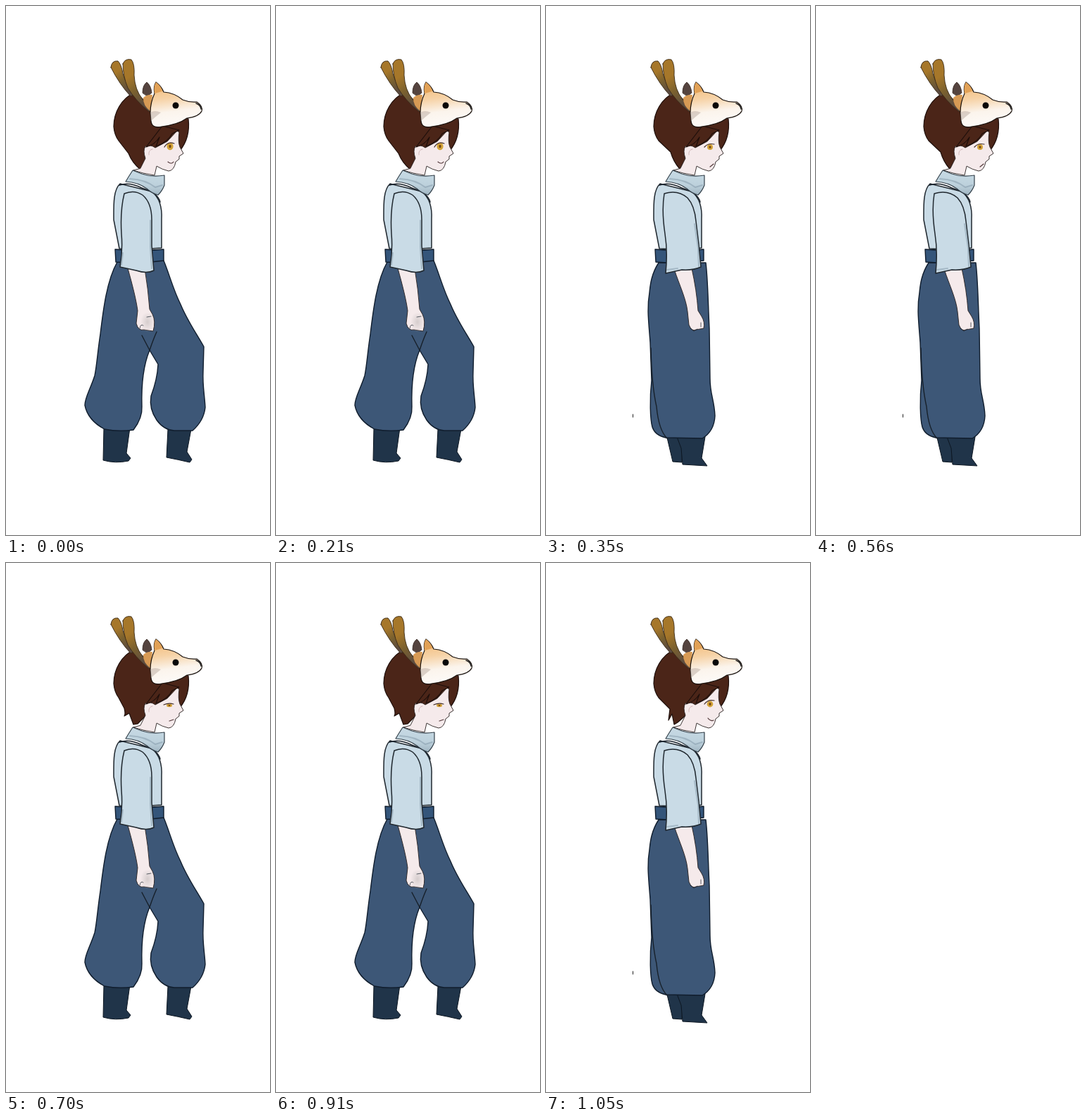
Animation, 375 px wide and 750 px high, one loop 1.4 s. Source, as an HTML page:

```html
<!DOCTYPE html>
<html lang="en">
<head>
<meta charset="utf-8">
<title>Walk cycle</title>
<style>
  html, body { margin: 0; width: 100%; height: 100%; overflow: hidden; background: #fff; }
  svg { display: block; width: 100%; height: 100%; }
  path { stroke-linejoin: round; stroke-linecap: round; }
  .line { fill: none; stroke: #17202a; stroke-width: 1.4; }
  .soft { fill: none; stroke: #8298a8; stroke-width: 2; opacity: .5; }
  .cloth { fill: #c9dbe6; stroke: #20282f; stroke-width: 1.5; }
  .pants { fill: #3d5777; stroke: #101d2d; stroke-width: 1.4; }
  .boot { fill: #203449; stroke: #0c1621; stroke-width: 1; }
  .skin { fill: #f5eaeb; stroke: #28201f; stroke-width: .9; }
  .hair { fill: #4b2518; stroke: #1d0e0a; stroke-width: 1.2; }
</style>
</head>
<body>
<svg viewBox="0 0 375 750">
  <defs>
    <linearGradient id="antler" x1="0" y1="0" x2=".45" y2="1">
      <stop offset=".35" stop-color="#a6772a"/>
      <stop offset=".65" stop-color="#79602f"/>
      <stop offset="1" stop-color="#5b4a40"/>
    </linearGradient>
    <linearGradient id="fur" x1=".35" y1="0" x2=".5" y2="1">
      <stop offset="0" stop-color="#f3bb78"/>
      <stop offset=".35" stop-color="#f6d2a6"/>
      <stop offset=".65" stop-color="#fbf4ec"/>
      <stop offset="1" stop-color="#fdfbf9"/>
    </linearGradient>
    <linearGradient id="knit" x1="0" y1="0" x2="0" y2="1">
      <stop offset="0" stop-color="#c7dae4"/>
      <stop offset=".6" stop-color="#bdd1dc"/>
      <stop offset="1" stop-color="#9fb4c1"/>
    </linearGradient>
    <radialGradient id="fist">
      <stop offset="0" stop-color="#d5cdcd"/>
      <stop offset="1" stop-color="#d5cdcd" stop-opacity="0"/>
    </radialGradient>
  </defs>

  <g id="stride">
    <path class="boot" d="M139 598L138 644Q155 649 174 645L177 641L171 634L176 598Z"/>
    <path class="boot" d="M230 600L228 640Q244 643 261 647L264 643L257 632L263 600Z"/>
    <path class="pants" d="M158 363C143 389 138 432 134 465C130 491 129 510 126 524C120 543 112 555 112 566Q116 587 140 600Q160 604 181 601Q194 584 193 568C192 533 196 507 204 488L216 508Q215 529 206 553Q203 571 214 587Q224 601 239 602L265 602Q281 588 283 569C282 550 279 539 280 518L281 483C269 462 257 445 248 423C237 401 232 380 224 361Z"/>
    <path class="line" d="M204 488L193 467M204 488Q209 473 214 462"/>
  </g>

  <g id="stand">
    <path class="boot" d="M172 612L180 646L193 647L194 612Z"/>
    <path class="boot" d="M186 611L192 627L194 650L229 652L221 641L226 611Z"/>
    <path class="pants" d="M160 364C149 381 148 397 147 406C143 429 146 449 148 477L150 531C147 557 148 586 151 597Q155 609 170 612L222 613Q239 603 240 581C239 558 233 551 233 528L232 457C230 418 230 388 227 364Z"/>
    <path class="line" d="M149 485Q150 537 157 568Q160 601 172 613"/>
    <path d="M123.5 579V583" stroke="#222" stroke-width="1"/>
  </g>

  <g>
    <path d="M155 345Q189 348 224 345L224 361Q190 366 156 363Z" fill="#34557a" stroke="#101d2d" stroke-width="1.4"/>
    <path class="cloth" d="M162 252C152 261 153 283 153 303L161 344Q190 346 221 343L221 302C222 284 217 271 207 263Z"/>
    <path class="line" d="M161 254Q175 249 193 258Q216 265 219 278"/>
  </g>

  <g id="strideArm">
    <path class="skin" d="M173 372C180 397 185 417 187 432L185 450Q188 461 196 459L209 461Q213 447 208 437L204 430Q202 402 197 372Z"/>
    <ellipse cx="201" cy="448" rx="10" ry="14" fill="url(#fist)"/>
    <path class="line" style="stroke-width:.7" d="M190 457Q191 450 195 453M200 441L206 440"/>
    <path class="cloth" d="M168 266Q182 260 194 268Q207 279 207 303L207 340L210 375Q200 380 185 375L162 370Q166 346 164 323Q162 290 168 266Z"/>
    <path class="soft" d="M205 304L205 341L207 372M166 350L164 367"/>
  </g>

  <g id="standArm">
    <path class="skin" d="M182 373C190 397 199 415 201 433L203 452Q207 462 213 459L224 457Q226 448 221 440L216 432Q214 403 207 372Z"/>
    <path class="line" style="stroke-width:.7" d="M205 457L210 461L215 458M220 455V449"/>
    <path class="cloth" d="M168 266Q187 260 201 272Q211 283 213 305L217 338L220 370Q209 375 193 374L170 379Q173 348 169 323Q164 290 168 266Z"/>
    <path class="soft" d="M211 309L216 343L217 369M172 374L187 372"/>
  </g>

  <g id="heads"></g>

  <path d="M180 233Q174 242 170 249Q188 250 200 259Q208 266 216 268Q222 262 225 254L225 240Q208 243 193 238Z" fill="url(#knit)" stroke="#35424c" stroke-width="1.2"/>
  <path class="soft" d="M176 245Q198 246 212 257L222 254"/>

  <g id="mask">
    <path d="M149 87Q150 77 159 78Q164 83 166 96Q171 113 184 125L177 128Q161 111 149 87Z" fill="url(#antler)" stroke="#392a18" stroke-width=".9"/>
    <path d="M166 82Q169 74 178 76Q183 82 182 98Q183 119 194 132L209 151L202 149Q183 133 173 116Q166 99 166 82Z" fill="url(#antler)" stroke="#392a18" stroke-width=".9"/>
    <path d="M194 123Q194 112 200 108Q206 113 207 123L201 128Z" fill="#55443f" stroke="#30221c" stroke-width=".8"/>
    <path d="M208 126Q201 125 195 130Q194 141 206 150Z" fill="#d79a55"/>
    <path d="M205 151Q205 137 211 124Q209 114 213 108Q221 114 224 122Q239 123 251 133Q261 137 271 136Q280 142 278 149Q274 157 257 159Q245 168 221 171Q207 174 206 163Z" fill="url(#fur)" stroke="#18110d" stroke-width="1.2"/>
    <path d="M211 124Q209 114 213 108Q221 114 222 121Z" fill="#e2a257"/>
    <path d="M205 151Q211 147 220 151Q211 158 206 163Z" fill="#b9aaa0" opacity=".5"/>
    <circle cx="241" cy="141" r="4.5" fill="#080808"/>
    <path d="M270 138Q276 140 277 146" fill="none" stroke="#222" stroke-width="1.6"/>
  </g>
</svg>

<script>
const STEP = 350, COUNT = 4;
const $ = id => document.getElementById(id);

// Each pose: nape of the hair, iris, eyelid and mouth.
const poses = [
  { nape: 'L174 209Q179 222 191 232', iris: [233, 199, 4.6, 5.2],
    lid: 'M225 200Q230 191 239 195', mouth: 'M230 221Q235 225 238 221' },
  { nape: 'L177 207Q181 221 190 231', iris: [233, 200, 4, 4],
    lid: 'M225 200Q230 194 239 196', mouth: 'M233 228L238 224' },
  { nape: 'L168 206Q170 214 168 217L175 213L181 229L187 228', iris: [232, 202, 4, 2.2],
    lid: 'M224 201Q231 198 238 200', mouth: 'M232 224L238 222' },
  { nape: 'L176 207L174 223L179 214L182 229L187 226', iris: [233, 200, 4.4, 4.4],
    lid: 'M225 200Q230 193 239 195', mouth: 'M230 220Q234 225 238 223' }
];

const head = ({ nape, iris: [x, y, rx, ry], lid, mouth }, i) => `
  <g id="head${i}">
    <path class="hair" d="M182 123C164 131 153 151 153 171Q154 183 160 191${nape}L202 213L240 205L247 205Q262 187 259 160L205 140Z"/>
    <path class="skin" d="M191 230L198 216Q194 205 198 199Q206 196 212 201L229 192L243 177L246 179Q244 192 247 200L252 209L246 213L246 217L241 221Q239 233 231 234Q222 232 214 227L211 240L195 237L181 233Z"/>
    <path class="hair" d="M199 200Q211 197 218 186L213 199Q230 193 236 181L246 176L222 170Z"/>
    <path d="M203 211Q202 204 208 203" fill="none" stroke="#d3b8b8" stroke-width="1"/>
    <ellipse cx="${x}" cy="${y}" rx="${rx}" ry="${ry}" fill="#d3a339"/>
    <ellipse cx="${x}" cy="${y}" rx="1.5" ry="${ry * .45}" fill="#6e4318"/>
    <path d="${lid}" fill="none" stroke="#402b25" stroke-width="1.2"/>
    <path d="${mouth}" fill="none" stroke="#51383a" stroke-width="1.2"/>
  </g>`;

$('heads').innerHTML = poses.map(head).join('');

function showDuring(id, steps) {
  const frames = Array.from({ length: COUNT + 1 }, (_, i) => ({
    opacity: steps.includes(i % COUNT) ? 1 : 0,
    offset: i / COUNT,
    easing: 'step-end'
  }));
  const loop = $(id).animate(frames, { duration: STEP * COUNT, iterations: Infinity });
  loop.startTime = 0;
  return loop;
}

const loops = [
  ...['stride', 'strideArm'].map(id => showDuring(id, [0, 2])),
  ...['stand', 'standArm'].map(id => showDuring(id, [1, 3])),
  ...poses.map((_, i) => showDuring('head' + i, [i]))
];
const start = document.timeline.currentTime ?? 0;
loops.forEach(loop => { loop.startTime = start; });
</script>
</body>
</html>
```
